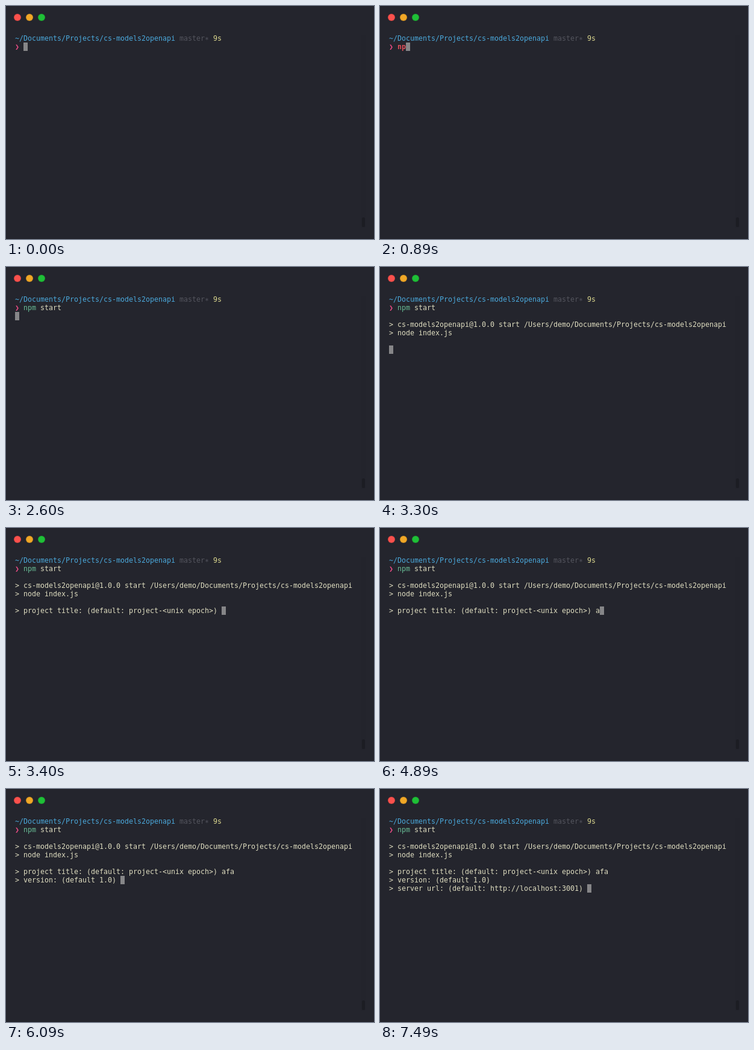
Write an HTML page that moves like this. It is 611 px wide and 389 px high and loops after 8000 ms.

```html
<!DOCTYPE html>
<html lang="en">
<head>
<meta charset="utf-8">
<title>Terminal session</title>
<style>
@property --t { syntax: "<number>"; inherits: true; initial-value: 0; }

html, body { margin: 0; width: 100%; height: 100%; overflow: hidden; background: #24252d; }

.window {
  position: relative;
  width: 611px;
  height: 389px;
  overflow: hidden;
  background: #24252d;
  box-shadow: inset 0 0 0 1px #1f2028;
  animation: clock 8s linear infinite;
}

.light {
  position: absolute;
  top: 13px;
  box-sizing: border-box;
  width: 12px;
  height: 12px;
  border-radius: 50%;
  border: 1px solid #0002;
}
.close { left: 13px; background: #fa514d; }
.minimize { left: 33px; background: #f1a827; }
.zoom { left: 53px; background: #1fc037; }

.track { position: absolute; left: 589px; top: 48px; width: 8px; height: 322px; background: #23242c; }
.thumb { position: absolute; left: 2px; bottom: 1px; width: 5px; height: 16px; border-radius: 2px; background: #1c1d23; }

.screen {
  position: absolute;
  left: 15px;
  top: 47px;
  font: 11.63px/14px "DejaVu Sans Mono", monospace;
  color: #dfddc0;
}
.screen p { margin: 0; height: 14px; white-space: pre; }

.path { color: #4ba9dc; }
.branch { color: #54555e; }
.time { color: #dcd88f; }
.prompt { color: #ef4d87; }
.ok { color: #68bd96; }
.bad { position: absolute; color: #e0505a; }

/* Visible from --at on, or until --end. */
i { font-style: normal; opacity: clamp(0, (var(--t) - var(--at) + .5) * 10, 1); }
.until { opacity: clamp(0, (var(--end) - var(--t) - .5) * 10, 1); }

.cursor {
  position: absolute;
  left: 0;
  top: 0;
  width: 7px;
  height: 14px;
  background: #868688;
  animation: cursor 8s step-end infinite;
}

@keyframes clock { from { --t: 0; } to { --t: 8000; } }

@keyframes cursor {
  0% { transform: translate(14px, 14px); }
  8.75% { transform: translate(21px, 14px); }
  11.125% { transform: translate(28px, 14px); }
  13.625% { transform: translate(35px, 14px); }
  16.25% { transform: translate(42px, 14px); }
  21.25% { transform: translate(49px, 14px); }
  23.75% { transform: translate(56px, 14px); }
  26.25% { transform: translate(63px, 14px); }
  27.5% { transform: translate(70px, 14px); }
  30% { transform: translate(77px, 14px); }
  32.5% { transform: translate(0, 28px); }
  41.25% { transform: translate(0, 84px); }
  42.5% { transform: translate(343px, 84px); }
  61.125% { transform: translate(350px, 84px); }
  64.875% { transform: translate(357px, 84px); }
  66.125% { transform: translate(364px, 84px); }
  76.125% { transform: translate(175px, 98px); }
  93.625%, 100% { transform: translate(329px, 112px); }
}
</style>
</head>
<body>
<div class="window">
  <div class="light close"></div>
  <div class="light minimize"></div>
  <div class="light zoom"></div>
  <div class="track"><div class="thumb"></div></div>
  <div class="screen">
    <div class="cursor"></div>
    <p><span class="path">~/Documents/Projects/cs-models2openapi</span> <span class="branch">master∗</span> <span class="time">9s</span></p>
    <p><span class="prompt">❯</span> <b class="bad until" style="--end:1090"><i style="--at:700">n</i><i style="--at:890">p</i></b><i class="ok" style="--at:1090">npm</i> <i style="--at:1700">s</i><i style="--at:1900">t</i><i style="--at:2100">a</i><i style="--at:2200">r</i><i style="--at:2400">t</i></p>
    <p></p>
    <p><i style="--at:3300">&gt; cs-models2openapi@1.0.0 start /Users/demo/Documents/Projects/cs-models2openapi</i></p>
    <p><i style="--at:3300">&gt; node index.js</i></p>
    <p></p>
    <p><i style="--at:3400">&gt; project title: (default: project-&lt;unix epoch&gt;) </i><i style="--at:4890">a</i><i style="--at:5190">f</i><i style="--at:5290">a</i></p>
    <p><i style="--at:6090">&gt; version: (default 1.0)</i></p>
    <p><i style="--at:7490">&gt; server url: (default: http://localhost:3001)</i></p>
  </div>
</div>
</body>
</html>
```
